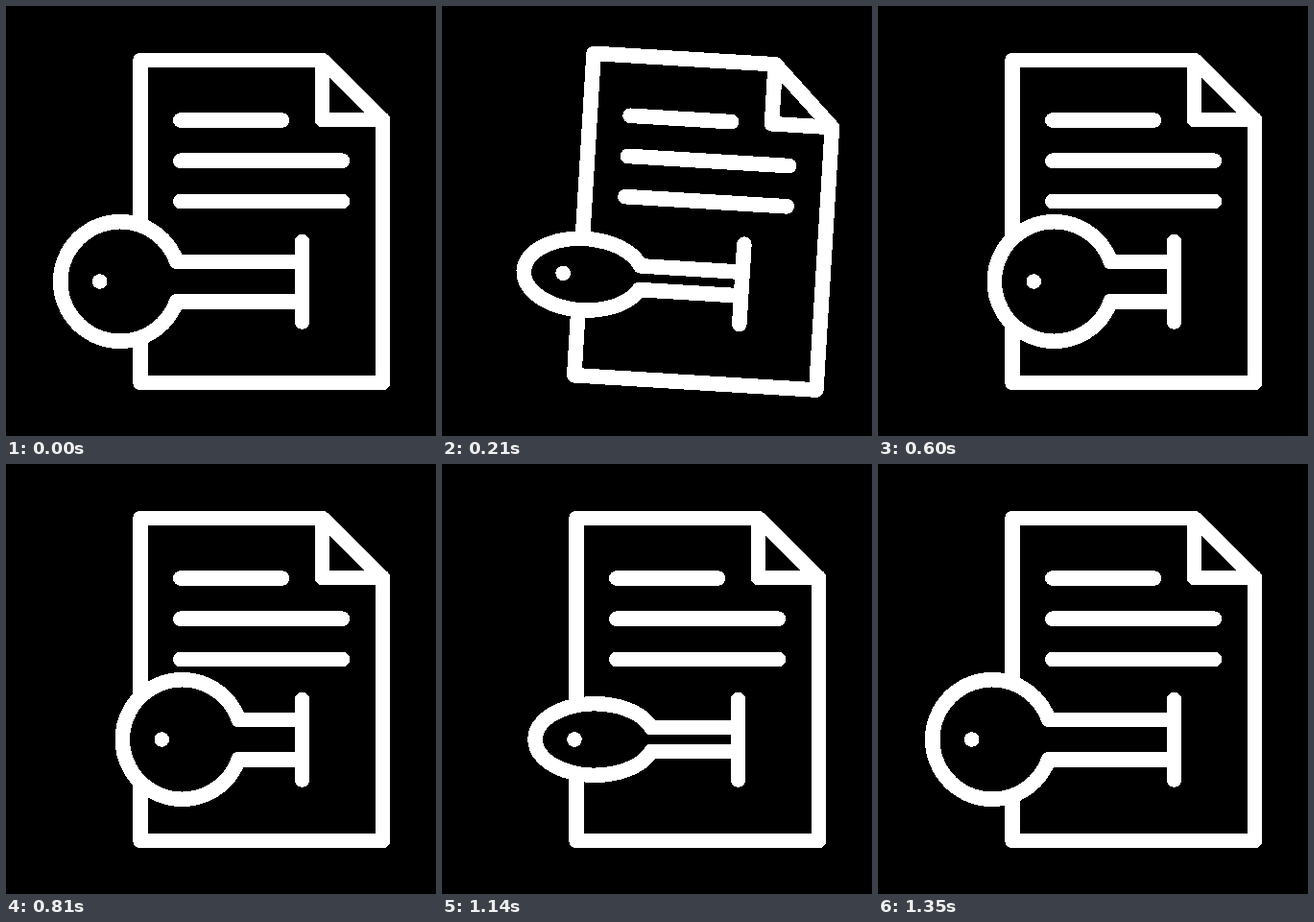
An HTML page that plays this animation: 448 px wide and 448 px high, repeating every 1.5 s.

```html
<!DOCTYPE html>
<html lang="en">
<head>
<meta charset="utf-8">
<title>Document key</title>
<style>
  html, body { margin: 0; width: 100%; height: 100%; overflow: hidden; background: #000; }
  svg { display: block; width: 100%; height: 100%; shape-rendering: crispEdges; }
  .ink { fill: none; stroke: #fff; stroke-width: 15.6; stroke-linecap: round; stroke-linejoin: round; }
  #key { fill: #000; }
</style>
</head>
<body>
<svg viewBox="0 0 448 448">
  <g id="icon" class="ink">
    <path d="M329.5 56.5H140V392.5H392.5V118.5Z"/>
    <path d="M329.5 56.5V118.5H392.5"/>
    <path d="M181.8 119H287.6M181.8 161.2H350.4M181.8 203.5H350.4"/>
    <path id="key"/>
    <path d="M308.5 245.5V329"/>
    <circle id="dot" cy="287" r="7.8" fill="#fff" stroke="none"/>
  </g>
</svg>
<script>
  const LOOP = 1500, STEP = 30;
  const SLIDE = 64.6;              // how far the key moves in
  const SQUASH = 1.07;             // flattening while the key turns
  const TILT = 4, PIVOT = '267 352';
  const RADIUS = 62.3, SHAFT = 20.7, MID = 287;

  const icon = document.getElementById('icon');
  const key = document.getElementById('key');
  const dot = document.getElementById('dot');

  // eased progress from 0 to 1 between two times
  function ease(t, from, to) {
    const u = Math.min(1, Math.max(0, (t - from) / (to - from)));
    return u * u * (3 - 2 * u);
  }

  function draw(t) {
    const tilt = TILT * (ease(t, 60, 120) - ease(t, 120, 515));
    icon.setAttribute('transform', `rotate(${tilt} ${PIVOT})`);

    const p = ease(t, 60, 420) - ease(t, 990, 1350);
    const dx = SLIDE * p;
    const flat = 1 - SQUASH * Math.min(p, 1 - p);
    const h = SHAFT * flat;
    const neck = 119 + Math.sqrt(RADIUS ** 2 - SHAFT ** 2) + dx;

    key.setAttribute('d',
      `M308.5 ${MID - h}L${neck} ${MID - h}` +
      `A${RADIUS} ${RADIUS * flat} 0 1 0 ${neck} ${MID + h}L308.5 ${MID + h}`);
    dot.setAttribute('cx', 97.7 + dx);
  }

  const start = performance.now();
  function tick() {
    const t = (performance.now() - start) % LOOP;
    draw(Math.floor(t / STEP) * STEP);
    requestAnimationFrame(tick);
  }
  draw(0);
  requestAnimationFrame(tick);
</script>
</body>
</html>
```
